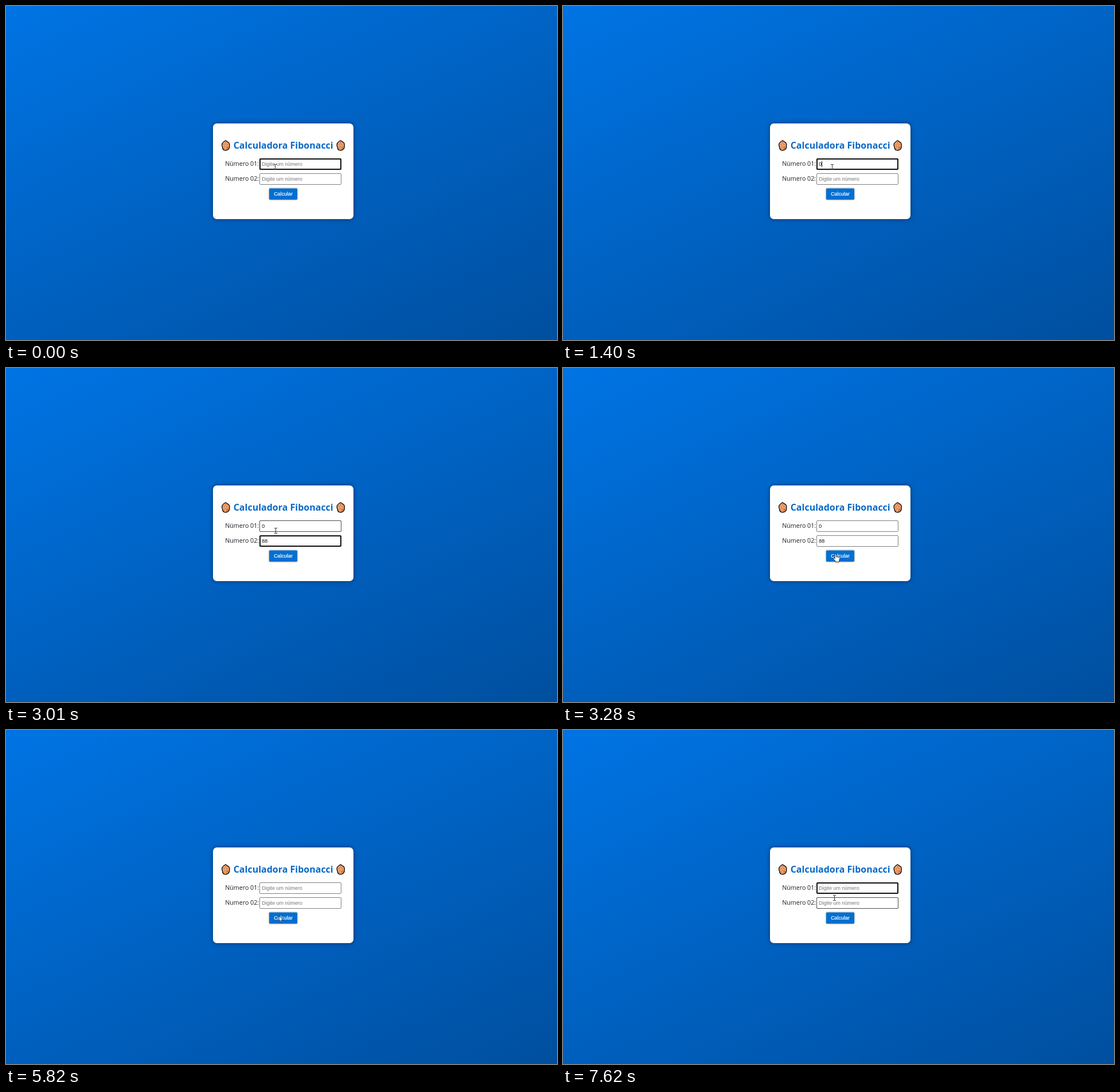
An HTML page that plays this animation: 961x583 px, repeating every 8000 ms.

```html
<!DOCTYPE html>
<html lang="pt-BR">
<head>
<meta charset="utf-8">
<title>Calculadora Fibonacci</title>
<style>
html, body { margin: 0; width: 100%; height: 100%; overflow: hidden; }
body { background: linear-gradient(155deg, #0074e4, #004f9f); }
svg { position: absolute; left: 0; top: 0; display: block; }
.card {
  position: absolute; left: 361px; top: 205px; width: 245px; height: 166.5px;
  border-radius: 6.7px; background: #fff; box-shadow: 0 0 7px rgba(0, 0, 0, .5);
  animation: card 8s step-end infinite;
}

text { font: 10.667px "Open Sans", "Noto Sans", sans-serif; fill: #1a1f26; }
.title { font-size: 16px; font-weight: 700; fill: #0969c8; }
.found { font-weight: 700; fill: #000; }
.mid { text-anchor: middle; }
.in, .hint, .btn { font: 8.93px "Liberation Sans", Arial, sans-serif; }
.in { fill: #111; }
.hint { fill: #757575; }
.btn { fill: #fff; stroke: #fff; stroke-width: .2px; text-anchor: middle; }
.key { fill: #006fd1; filter: drop-shadow(0 0 1.5px rgba(0, 0, 0, .5)); }
.box { fill: #fff; stroke: #808080; stroke-width: 1px; }
.hover { fill: none; stroke: #4c4c4c; stroke-width: 1px; }
.ring { fill: none; stroke: #101010; stroke-width: 2px; }
.arrow path, .hand path { fill: #fff; stroke: #222; stroke-width: .9px; stroke-linejoin: round; }
.beam path { fill: none; stroke: #333; stroke-width: 1px; }

svg [class*="a-"] { animation: 8s step-end infinite; }
svg .a-form { animation-name: form; }
svg .a-result { animation-name: result; }
svg .a-hint1 { animation-name: hint1; }
svg .a-hint2 { animation-name: hint2; }
svg .a-first { animation-name: first; }
svg .a-eight { animation-name: eight; }
svg .a-second { animation-name: second; }
svg .a-ring1 { animation-name: ring1; }
svg .a-ring2 { animation-name: ring2; }
svg .a-hover1 { animation-name: hover1; }
svg .a-hover2 { animation-name: hover2; }
svg .a-caret { animation-name: caretMove, caretBlink; }
svg .a-mouse { animation-name: mouse; }
svg .a-beam { animation-name: beam; }
svg .a-arrow { animation-name: arrow; }
svg .a-hand { animation-name: hand; }

/* 1% = 80 ms */
@keyframes card {
  0%, 72.75%, 100% { left: 361px; top: 205px; width: 245px; height: 166.5px; }
  52.625% { left: 342px; top: 187.8px; width: 282.5px; height: 222.2px; }
}
@keyframes form {
  0%, 72.75%, 100% { transform: none; }
  52.625% { transform: translateY(-17px); }
}
@keyframes result { 0%, 72.75%, 100% { opacity: 0; } 52.625% { opacity: 1; } }
@keyframes hint1 { 0%, 72.75%, 100% { opacity: 1; } 17.5% { opacity: 0; } }
@keyframes hint2 { 0%, 72.75%, 100% { opacity: 1; } 24.375% { opacity: 0; } }
@keyframes first { 0%, 72.75%, 100% { opacity: 0; } 17.5% { opacity: 1; } }
@keyframes eight { 0%, 26%, 100% { opacity: 0; } 24.375% { opacity: 1; } }
@keyframes second { 0%, 72.75%, 100% { opacity: 0; } 26% { opacity: 1; } }
@keyframes ring1 { 0%, 88.625%, 100% { opacity: 1; } 20.75% { opacity: 0; } }
@keyframes ring2 { 0%, 41%, 100% { opacity: 0; } 20.75% { opacity: 1; } }
@keyframes hover1 { 0% { opacity: 1; } 38.5%, 100% { opacity: 0; } }
@keyframes hover2 {
  0%, 39.3% { opacity: 0; }
  38.5%, 84.375%, 100% { opacity: 1; }
}
@keyframes caretMove {
  0%, 41%, 100% { transform: none; }
  17.5% { transform: translate(5px, 0); }
  20.75% { transform: translate(0, 26px); }
  24.375% { transform: translate(5px, 26px); }
  26% { transform: translate(10px, 26px); }
}
@keyframes caretBlink {
  0%, 6.75%, 33.5%, 41%, 95.25%, 100% { opacity: 0; }
  .875%, 13.375%, 40.15%, 88.625% { opacity: 1; }
}
@keyframes mouse {
  0% { transform: translate(469px, 281px); }
  37.625% { transform: translate(470px, 284px); }
  38.5% { transform: translate(472px, 297px); }
  39.3% { transform: translate(474px, 313px); }
  40.15% { transform: translate(476px, 324px); }
  84.375% { transform: translate(474px, 304px); }
  85.25%, 100% { transform: translate(473px, 293px); }
}
@keyframes beam { 0%, 84.375%, 100% { opacity: 1; } 39.3% { opacity: 0; } }
@keyframes arrow { 0%, 40.15%, 84.375%, 100% { opacity: 0; } 39.3%, 52.625% { opacity: 1; } }
@keyframes hand { 0%, 52.625%, 100% { opacity: 0; } 40.15% { opacity: 1; } }
</style>
</head>
<body>
<div class="card"></div>
<svg width="961" height="583" viewBox="0 0 961 583">
  <defs>
    <g id="nut">
      <path d="M7.3 .9 L9.6 2.3 L13 4.6 Q14.6 6.5 14 10 Q14.6 14 11.4 16.6 Q8.5 18.6 5 17.6 Q2.2 16.4 1.8 12.4 Q.2 9 1.2 6.2 Q3.6 2.2 7.3 .9Z" fill="#eda06c" stroke="#1b120e" stroke-width="1.4" stroke-linejoin="round"/>
      <path d="M10.8 10.8 Q13.2 11.8 11.6 14.6 Q9.8 17 7.4 16.6 Q10.4 14.2 10.8 10.8Z" fill="#c77445"/>
      <g fill="#a9582f">
        <circle cx="7.2" cy="4.8" r=".8"/><circle cx="4.4" cy="8" r=".7"/>
        <circle cx="9.8" cy="7.6" r=".8"/><circle cx="6.4" cy="11.4" r=".7"/>
        <circle cx="9.4" cy="12.6" r=".8"/><circle cx="5" cy="14.4" r=".6"/>
      </g>
    </g>
    <rect id="edge" x="442.5" y="266.5" width="142" height="19" rx="1.4"/>
    <rect id="thick" x="443" y="267" width="141" height="18" rx="1.2"/>
  </defs>

  <g class="a-form">
    <use href="#nut" x="375.7" y="234"/>
    <use href="#nut" x="576.2" y="234"/>
    <text class="title mid" x="483.7" y="249">Calculadora Fibonacci</text>

    <text x="382.3" y="279">Número 01:</text>
    <use href="#edge" class="box"/>
    <use href="#edge" class="hover a-hover1"/>
    <use href="#thick" class="ring a-ring1"/>
    <text class="hint a-hint1" x="446.2" y="279">Digite um número</text>
    <text class="in a-first" x="446.2" y="279">0</text>

    <text x="382.3" y="305">Numero 02:</text>
    <g transform="translate(0 26)">
      <use href="#edge" class="box"/>
      <use href="#edge" class="hover a-hover2"/>
      <use href="#thick" class="ring a-ring2"/>
      <text class="hint a-hint2" x="446.2" y="279">Digite um número</text>
      <text class="in a-eight" x="446.2" y="279">8</text>
      <text class="in a-second" x="446.2" y="279">88</text>
    </g>
    <rect class="a-caret" x="446" y="271" width="1" height="10" fill="#111"/>

    <rect class="key" x="459" y="318.4" width="49" height="19.6" rx="1.4"/>
    <text class="btn" x="483.5" y="331">Calcular</text>
  </g>

  <g class="a-result">
    <text class="found mid" x="483.5" y="346">Números de Fibonacci encontrados entre 0 e 88:</text>
    <text class="mid" x="483.5" y="367">0, 1, 1, 2, 3, 5, 8, 13, 21, 34, 55</text>
    <rect class="key" x="458.3" y="377.2" width="50.4" height="19.6" rx="1.4"/>
    <text class="btn" x="483.5" y="390">Reiniciar</text>
  </g>

  <g class="a-mouse">
    <g class="beam a-beam"><path d="M-2 -4.5H0M1 -4.5H3M.5 -4.5V4.5M-2 4.5H0M1 4.5H3"/></g>
    <g class="arrow a-arrow"><path d="M.3 .4V10.2L2.5 8.2L4.1 11.7L5.7 11L4.2 7.6H7.2Z"/></g>
    <g class="hand a-hand"><path d="M-1.8 1.2Q-.6 -.4 .5 1.2V5.4L6 6.6Q7 7 6.8 8.6L5.6 12.4V14.6H-.8V13.2L-4.8 8.6Q-5 7 -3.4 7.4L-1.8 8.8Z"/></g>
  </g>
</svg>
</body>
</html>
```
